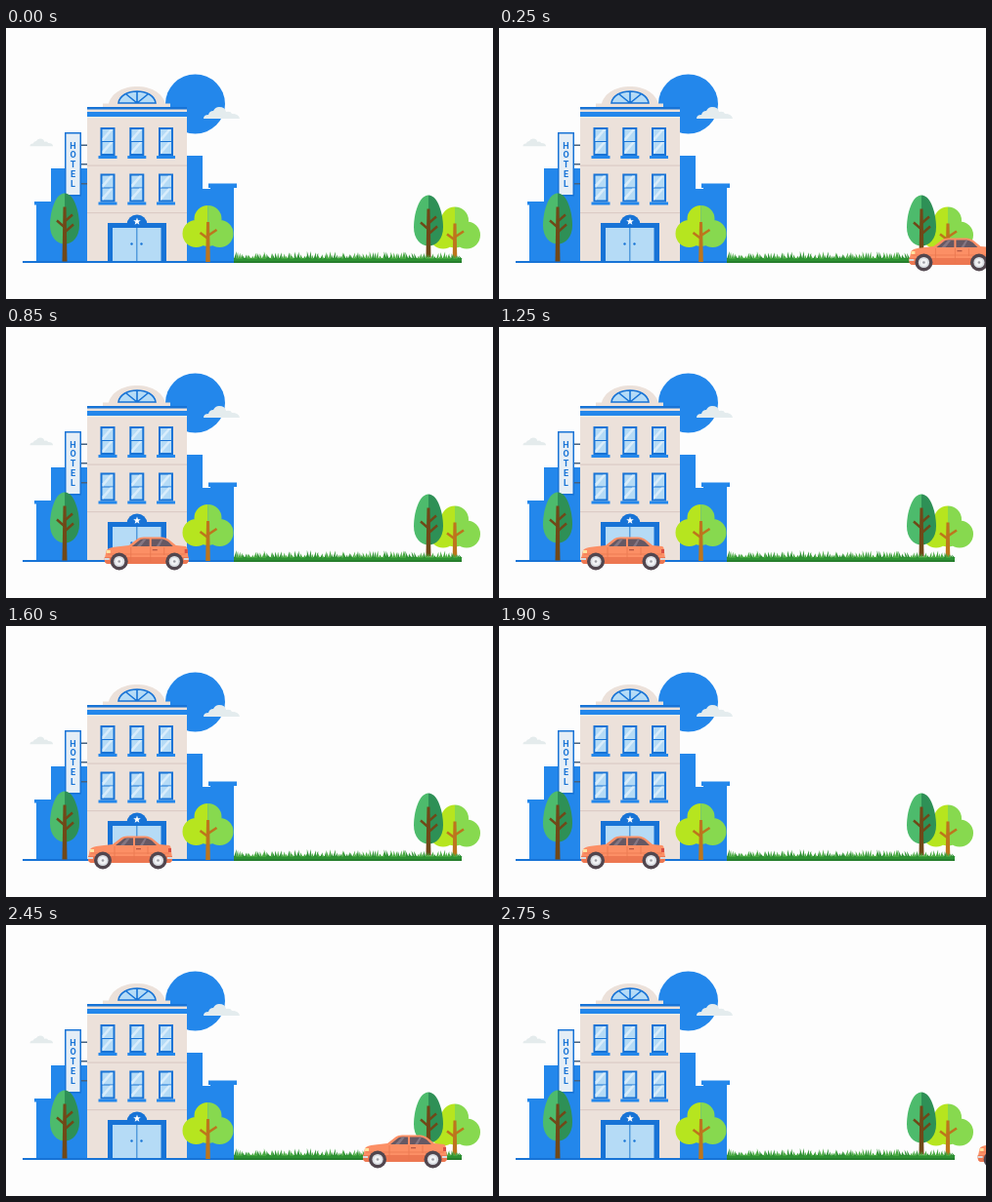
Write an HTML page with a canvas that moves like this. It is 498 px wide and 278 px high and loops after 2800 ms.

```html
<!DOCTYPE html>
<html lang="en">
<head>
<meta charset="utf-8">
<title>Hotel arrival</title>
<style>
  html, body { margin: 0; width: 100%; height: 100%; overflow: hidden; background: #fdfdfd; }
  canvas { display: block; width: 498px; height: 278px; }
</style>
</head>
<body>
<canvas id="stage" width="498" height="278"></canvas>
<script>
const ctx = document.getElementById('stage').getContext('2d');
const LOOP = 2800;
const BLUE = '#2387eb', DEEP = '#1773d6', WALL = '#ece1da', GLASS = '#b5dbf6', PAPER = '#fdfdfd';

function rect(x, y, w, h, color) {
  ctx.fillStyle = color;
  ctx.fillRect(x, y, w, h);
}

function disc(x, y, r, color) {
  ctx.fillStyle = color;
  ctx.beginPath();
  ctx.arc(x, y, r, 0, Math.PI * 2);
  ctx.fill();
}

function shape(path, color) {
  ctx.fillStyle = color;
  ctx.fill(new Path2D(path));
}

function line(path, color, width) {
  ctx.strokeStyle = color;
  ctx.lineWidth = width;
  ctx.stroke(new Path2D(path));
}

function at(x, y, draw) {
  ctx.save();
  ctx.translate(x, y);
  draw();
  ctx.restore();
}

// Fills a silhouette in two colours split along x = 0.
function halves(path, left, right) {
  ctx.save();
  ctx.clip(path);
  rect(-40, -80, 40, 160, left);
  rect(0, -80, 40, 160, right);
  ctx.restore();
}

function cloud(x, y, scale, color) {
  at(x, y, () => {
    ctx.scale(scale, scale);
    shape('M0 12 Q0 8 5 8 Q6 4 10 4 Q12 0 16 0 Q22 0 23 5 Q28 4 29 7 Q36 7 37 12 Z', color);
  });
}

function skyline() {
  disc(193.5, 78, 30.5, BLUE);
  cloud(202, 81, 1, '#e4ecee');
  cloud(24.5, 113.5, 0.64, '#e4ebec');
  rect(31, 180, 52, 60, BLUE);
  rect(29, 178, 18, 3.5, BLUE);
  rect(46, 144, 37, 96, BLUE);
  rect(184, 131, 17, 109, BLUE);
  rect(201, 165, 32, 75, BLUE);
  rect(207, 159.5, 29, 4.5, BLUE);
  rect(209, 163, 24, 4, BLUE);
}

function windowAt(x, y) {
  rect(x, y, 15, 29, DEEP);
  for (const top of [2, 15]) {
    rect(x + 2, y + top, 11, 12, GLASS);
    shape(`M${x + 2} ${y + top + 9} L${x + 10} ${y + top} H${x + 13} L${x + 3} ${y + top + 12} H${x + 2} Z`, '#d9edfb');
  }
  rect(x - 2, y + 29, 19, 3, BLUE);
}

function star(x, y, r) {
  ctx.fillStyle = '#fff';
  ctx.beginPath();
  for (let i = 0; i < 10; i++) {
    const a = i * Math.PI / 5 - Math.PI / 2, d = i % 2 ? r * 0.42 : r;
    ctx.lineTo(x + d * Math.cos(a), y + d * Math.sin(a));
  }
  ctx.fill();
}

function hotel() {
  shape('M99 81 V77.5 H105 C111 54 157 54 163 77.5 H168 V81 Z', WALL);
  const arch = 'M115 77 C117 61 151 61 153 77 Z';
  shape(arch, GLASS);
  line(arch + ' M134 65 V77 M134 77 L123 68 M134 77 L145 68', DEEP, 1.6);

  rect(83, 81, 102, 159, WALL);
  rect(83, 81, 102, 2.5, DEEP);
  rect(83, 86, 102, 5, BLUE);
  rect(83, 91, 102, 1.5, '#f5ede7');
  for (const y of [140.5, 189]) rect(83, y, 102, 1.2, '#dccbc5');
  for (const y of [102, 149.5]) {
    for (const x of [96.5, 126.3, 156]) windowAt(x, y);
  }

  ctx.fillStyle = DEEP;
  ctx.beginPath();
  ctx.arc(134, 202, 10.5, Math.PI, 0);
  ctx.fill();
  rect(104, 200, 60, 40, DEEP);
  rect(109, 205, 49.5, 35, GLASS);
  rect(133, 205, 1.5, 35, '#549cdc');
  disc(128.5, 221.5, 1.2, DEEP);
  disc(138.5, 221.5, 1.2, DEEP);
  star(134, 198.5, 4);
}

function sign() {
  for (const y of [119.5, 139, 159]) rect(77, y, 6, 1.5, '#47627f');
  rect(60, 107, 17, 65.5, DEEP);
  rect(61.5, 108.5, 14, 62.5, '#e5eef6');
  ctx.fillStyle = DEEP;
  ctx.font = 'bold 9px Roboto, Arial, sans-serif';
  ctx.textAlign = 'center';
  ctx.textBaseline = 'middle';
  [...'HOTEL'].forEach((letter, i) => ctx.fillText(letter, 68.5, 121 + i * 9.8));
}

function tallTree(x, y, height) {
  at(x, y, () => {
    halves(new Path2D('M0 0 C10 0 15 20 15 33 C15 45 8 52 0 52 C-8 52 -15 45 -15 33 C-15 20 -10 0 0 0 Z'),
      '#4dbb6c', '#2e9056');
    shape(`M-1.5 14 H1.5 L2.5 ${height} H-2.5 Z`, '#704818');
    line('M0 29 L8 22 M0 40 L9 32 M0 35 L-8 28', '#704818', 2.4);
  });
}

function roundTree(x, y, height) {
  at(x, y, () => {
    const crown = new Path2D();
    for (const [cx, cy, r] of [[0, 14, 14], [-12, 29, 14], [12, 29, 14], [0, 30, 12]]) {
      crown.moveTo(cx + r, cy);
      crown.arc(cx, cy, r, 0, Math.PI * 2);
    }
    halves(crown, '#b6e51f', '#87d94f');
    shape(`M-1.5 17 H1.5 L2.3 ${height} H-2.3 Z`, '#bd751d');
    line('M0 31 L9 25 M0 34 L-8 28', '#bd751d', 2.6);
  });
}

function grass() {
  let seed = 7;
  const random = () => (seed = seed * 16807 % 2147483647) / 2147483647;
  rect(233, 236, 233, 5, '#2f9234');
  for (let x = 233; x < 464; x += 2.2) {
    const tip = 229 + random() * 5, lean = random() * 4 - 2;
    shape(`M${x} 237 L${x + 1 + lean} ${tip} L${x + 2.6} 237 Z`, random() < 0.5 ? '#2f9234' : '#45a83f');
  }
  rect(233, 239, 233, 2, '#267f2d');
}

function wheel(x) {
  disc(x, 240.5, 9, '#51464e');
  disc(x, 240.5, 5.6, '#d9dde2');
  disc(x, 240.5, 3.8, '#f1f2f4');
  disc(x, 240.5, 1.3, '#9b9ca3');
}

function car(x) {
  at(x, 0, () => {
    shape('M2 229 Q4 226 12 225.5 L25 224 L34 217 Q36 215.5 40 215.5 H58 Q63 215.5 67 219 L73 224 L83 225 Q85 226 85 231 L86 238 Q86 243 82 243 H4 Q0 243 0 238 Z', '#fc8f65');
    shape('M0 236 H86 V239 Q86 243 82 243 H4 Q0 243 0 239 Z', '#ed7751');
    shape('M28 225 L36 218.5 Q37 217.5 40 217.5 H46 V225 Z', '#665863');
    shape('M48 217.5 H58 Q62 217.5 65 220 L70 225 H48 Z', '#665863');
    shape('M33 225 L40 217.5 H43 L37 225 Z M53 225 L58 217.5 H60 L56 225 Z', '#857783');
    line('M27 226 V241 M47 226 V241 M61 226 V234 M3 233 H83', '#e9774e', 0.8);
    rect(49, 228, 5, 1.3, '#b65742');
    rect(2, 229, 4, 3, '#ffe3a1');
    rect(82, 228, 3, 4, '#d94f43');
    rect(0, 237, 5, 2, '#d9dadd');
    rect(81, 237, 5, 2, '#d9dadd');
    wheel(15);
    wheel(71.5);
  });
}

// Cubic bezier easing with control points (a, 0) and (b, 1).
function ease(p, a, b) {
  if (p <= 0) return 0;
  if (p >= 1) return 1;
  let low = 0, high = 1, u = 0.5;
  for (let i = 0; i < 24; i++) {
    u = (low + high) / 2;
    const v = 1 - u;
    if (3 * a * u * v * v + 3 * b * u * u * v + u * u * u < p) low = u;
    else high = u;
  }
  return u * u * (3 - 2 * u);
}

function carX(t) {
  const arrive = ease(t / 1100, 0.34, 0.28);
  const leave = ease((t - 1943) / 925, 0.34, 0.5);
  return 510 - 426 * arrive + 415 * leave;
}

function draw(t) {
  rect(0, 0, 498, 278, PAPER);
  skyline();
  hotel();
  sign();
  rect(17, 239, 216, 2, DEEP);
  tallTree(60, 169.5, 70);
  roundTree(206.5, 182, 58);
  roundTree(459, 183.5, 53);
  tallTree(432, 171.5, 64);
  grass();
  car(carX(t));
}

function frame() {
  draw(performance.now() % LOOP);
  requestAnimationFrame(frame);
}
frame();
</script>
</body>
</html>
```
